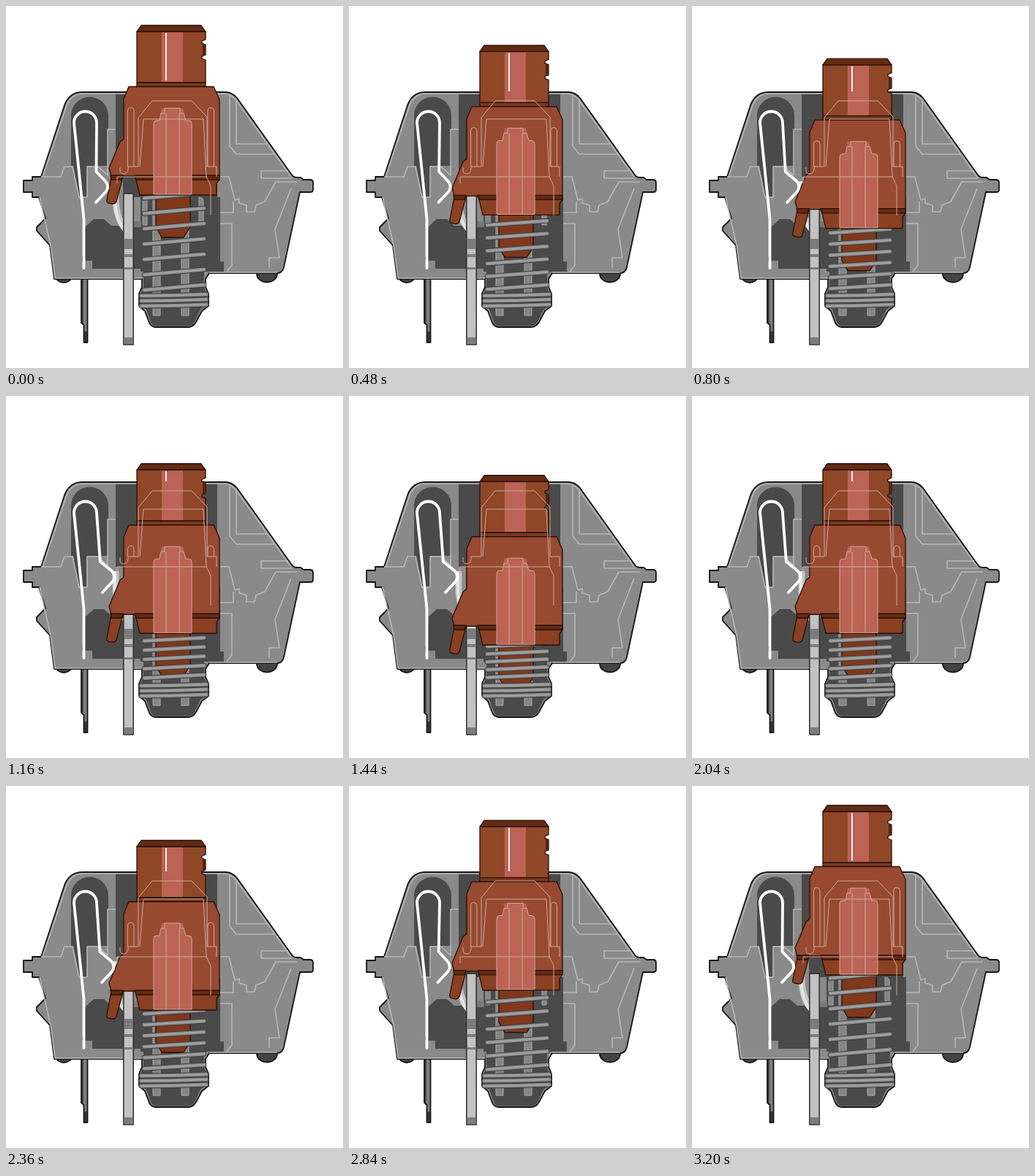
These frames come from a looping animation (461x496 px, 3.24 s). An HTML page:

```html
<!DOCTYPE html>
<html lang="en">
<head>
<meta charset="utf-8">
<title>Key switch cross-section</title>
<style>
html, body { margin: 0; width: 100%; height: 100%; overflow: hidden; background: #fff; }
svg { display: block; width: 461px; height: 496px; }
path, line { stroke-linejoin: round; }
.dark { fill: #4a4a4a; }
.edge { stroke: #151515; stroke-width: 1.8; }
.seam { fill: none; stroke: #b8b8b8; stroke-width: 1.6; }
.bar { fill: #858585; stroke: #a9a9a9; }
.stem { stroke: #2a0f06; stroke-width: 1.3; }
.ghost { fill: none; stroke: #cfa99d; stroke-width: 1; }
.coil { fill: none; stroke-linecap: round; }
</style>
</head>
<body>
<svg viewBox="0 0 461 496">
  <!-- feet and left pin -->
  <ellipse cx="79" cy="370" rx="11" ry="9" fill="#444" class="edge"/>
  <ellipse cx="357" cy="367" rx="14" ry="11.5" fill="#444" class="edge"/>
  <path d="M103 362V434L106.500 437V461H111.500V362Z" fill="#7c7c7c" class="edge"/>
  <path d="M107 446H111V460H107ZM104 374H105.500V434H104Z" fill="#333"/>

  <!-- housing -->
  <path class="edge" fill="#8a8a8a" d="M105 118H300Q309 118 316 126L390 230Q393 235 398 235H403L407 238H416Q420 238 420 242V252Q420 255 416 255H402L380 358Q378 366 371 366H278L273 374V385L277 394V411L268 418L260 433Q256 440 249 440H205Q199 440 196 434L190 418L182 411V394L186 385V374H66L60 328L42 308V303L54 291L45 262H36V255H24V239H36V234H48L79 139Q85 118 105 118Z"/>
  <path class="dark" d="M89 219V150A25.5 25.5 0 0 1 140 150V219H111V262H100L92 219Z"/>
  <path class="dark" d="M150 120H289V262H293V350H298V364H271V386L275 394V410L266 416L258 433Q255 438.500 248 438.500H206Q200 438.500 198 433L192 416L184 410V394L188 386V364H184V262H150Z"/>
  <path fill="#8a8a8a" d="M140 234H160V300H140Z"/>
  <path class="dark" d="M108 303L120 292H134L144 301H186V360H118V349H104V343H108Z"/>
  <path fill="#777" d="M174 295H185V303H174Z"/>

  <!-- housing seams -->
  <g class="seam">
    <path d="M48 234H75L80 220H91L100 262H111V220H126L139 232V169H150"/>
    <path d="M50 234L82 139Q88 120 105 120H299Q308 121 314 128L390 234"/>
    <path d="M46 262L61 328L67 373H186M278 365H371"/>
    <path d="M306 121V192L315 203H368M315 130V189H358"/>
    <path d="M386 226H349V236H392"/>
    <path d="M293 234H305L313 266L319 264V270L329 273V282H340L342 273L354 268L369 241H398"/>
    <path d="M293 283H311V268M293 298H309V355L302 364M390 250L368 306L374 345H360V359"/>
  </g>

  <g class="bar">
    <path d="M201 262H211V424H201ZM240 262H250V424H240Z"/>
    <path d="M187 300V268Q188 262 193 262V300ZM264 300V262Q270 262 270 268V300Z"/>
  </g>
  <g fill="none">
    <path d="M150 240V268Q152 295 165 307" stroke="#c4c4c4" stroke-width="9"/>
    <path d="M149 240V268Q151 296 164 309" stroke="#e4e4e4" stroke-width="4"/>
  </g>

  <path id="pole" class="stem" fill="#7f381b" d="M205 250H252V303L243 317H213L205 303Z"/>
  <path class="coil" stroke="#3d3d3d" stroke-width="6.8"/>
  <path class="coil" stroke="#8c8c8c" stroke-width="5"/>
  <path class="coil" stroke="#a8a8a8" stroke-width="1.5"/>

  <!-- contact plate -->
  <path d="M160.800 257H174.200V464H160.800Z" fill="#c2c2c2" stroke="#2c2c2c" stroke-width="1.5"/>
  <path d="M162 319H173.500V333H162ZM162 340H173.500V344H162ZM162 358H173.500V361H162ZM162 454H173.500V463H162Z" fill="#7c7c7c"/>

  <!-- stem -->
  <g id="stem">
    <path class="stem" fill="#8f4728" d="M179 35H273V46L268 48V51L273 53V67L268 69V72L273 74V105H179Z"/>
    <path d="M269 52H273V68H269Z" fill="#542410"/>
    <path d="M213 36H242V104H213Z" fill="#bb6355"/>
    <path class="stem" fill="#642b14" d="M185 26.500H267L273 35H179Z"/>
    <path class="stem" fill="#7a3a1f" d="M179 105H273V110.500H179Z"/>
    <path class="stem" fill="#8a4022" d="M144 234H160L151 268Q149 272 145 271L140 270Q137 269 138 265Z"/>
    <path class="stem" fill="#8a4022" d="M177 234H292V238L288 243V259H183Z"/>
    <path class="stem" fill="#974a30" d="M168 110.500H284L292 128V233H144L141 222L156 186L161 182V127Z"/>
    <path class="stem" fill="#642b14" d="M143 232H160L158 238H144ZM176 232H292V238H178Z"/>
    <path fill="#bb6355" d="M202 258V160Q202 157 206 157H210L213 140H242L246 157H250Q254 157 254 160V258Z"/>
    <path class="ghost" d="M202 258V161Q202 157 206 157H210L212 147H217V140H238V147H243L246 157H250Q254 157 254 161V258ZM219 147V258M237 147V258"/>
  </g>
  <line id="shine" x1="219" x2="219" stroke="#fff" stroke-width="1.8"/>

  <!-- housing lines seen through the stem -->
  <g class="ghost">
    <path d="M181 220V153L200 130H254L275 152V220"/>
    <path d="M183 220L188 155H270L274 234L280 246V287"/>
    <path d="M152 243V234H275M167 220H181M275 220H288V234"/>
    <path id="slots"/>
  </g>

  <path id="leaf" fill="none" stroke="#fff" stroke-width="3.8" stroke-linecap="round"/>
</svg>
<script>
const STEP = 40, COUNT = 81, TRAVEL = 2.285;
const $ = id => document.getElementById(id);
const set = (id, name, value) => $(id).setAttribute(name, value);
const coils = document.querySelectorAll('.coil');

const bend = [[0, 0], [14, 0], [23, -2], [29, 0], [50, 9], [100, 9]];
function lerp(table, x) {
  const i = Math.max(1, table.findIndex(p => p[0] >= x));
  const [x0, y0] = table[i - 1], [x1, y1] = table[i];
  return y0 + (y1 - y0) * (x - x0) / (x1 - x0);
}

// The upper end of the spring sits inside the stem and moves with it.
function springPath(press) {
  const top = 214 + press, bottom = 382, turns = 8;
  const gap = (bottom - top) / turns;
  let d = '';
  for (let k = 0; k <= turns; k++) {
    const y = top + gap * k;
    d += `M189 ${y + gap * 0.35}Q230 ${y + gap * 0.18} 271 ${y}`;
  }
  for (const y of [396, 403, 410]) d += `M185 ${y + 1}Q230 ${y + 1} 274 ${y - 1}`;
  return d;
}

function slotPath(press) {
  const top = 139 + press;
  let d = 'M156 221V225Q156 230 161 230T167 224V220';
  if (top < 216) {
    for (const x of [166.5, 276]) {
      d += `M${x} 220V${top + 4}Q${x} ${top} ${x + 4} ${top}T${x + 8.5} ${top + 4}V220`;
    }
  }
  return d;
}

function leafPath(d) {
  return `M106.500 359V292L93 160A15.500 15.500 0 0 1 124 160L${123.5 + d * 0.6} 227` +
    `L${136 + d} 240Q${142 + d} 247 ${137 + d} 254L${123 + d} 269`;
}

function draw(ms) {
  const n = Math.floor(ms / STEP) % COUNT;
  const press = TRAVEL * Math.min(n, COUNT - 1 - n);
  const shift = `translate(0 ${press})`;
  set('stem', 'transform', shift);
  set('pole', 'transform', shift);

  const spring = springPath(press);
  coils.forEach(coil => coil.setAttribute('d', spring));
  set('slots', 'd', slotPath(press));
  set('leaf', 'd', leafPath(lerp(bend, press)));

  const start = 37 + press;
  set('shine', 'y1', start);
  set('shine', 'y2', Math.max(start, Math.min(102 + press, 117)));
}

const begin = performance.now();
function tick() {
  draw(performance.now() - begin);
  requestAnimationFrame(tick);
}
tick();
</script>
</body>
</html>
```
